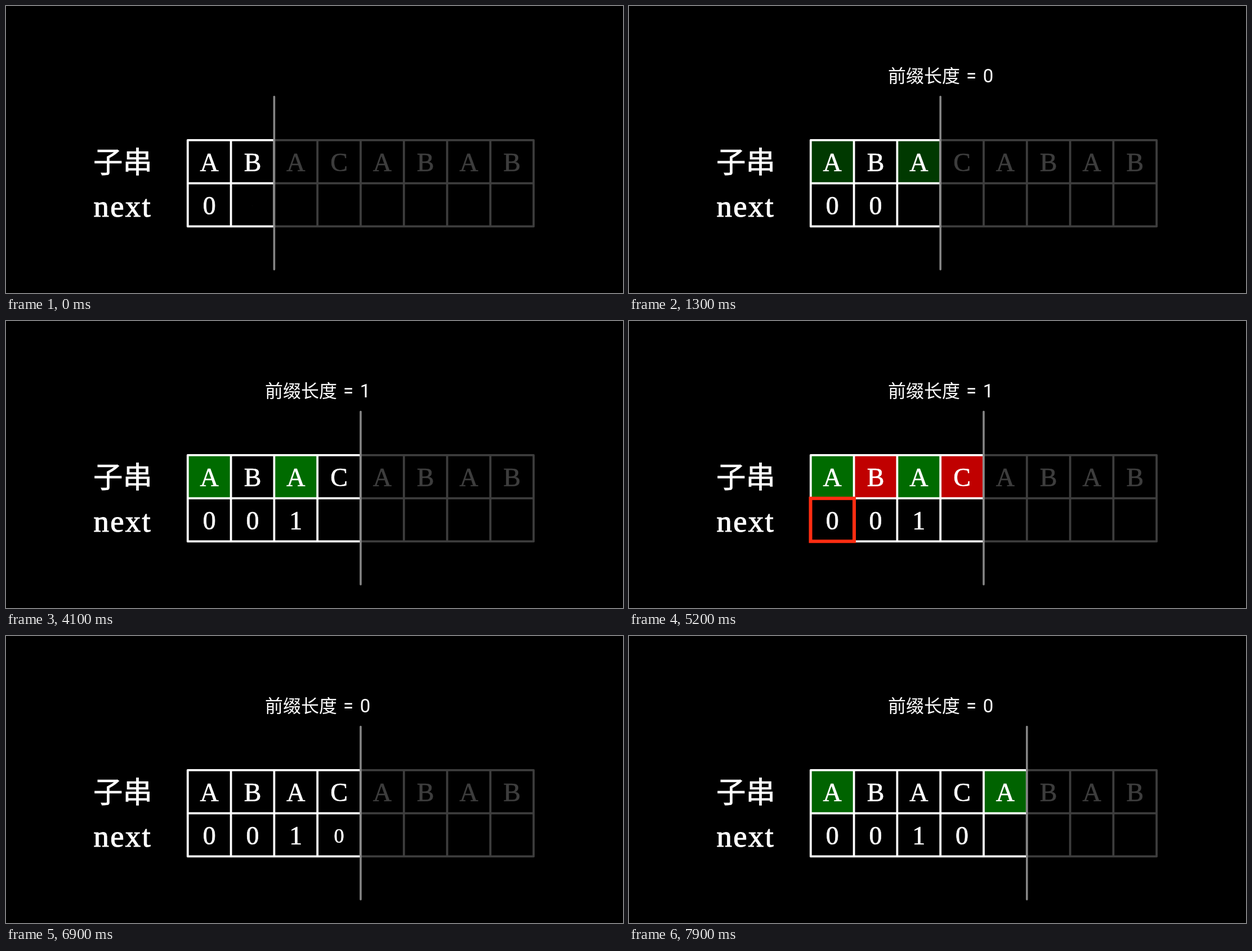
An HTML page for the animation above (8000 ms loop, 1096x511 px).

```html
<!DOCTYPE html>
<html lang="zh-CN">
<head>
<meta charset="utf-8">
<title>next</title>
<style>
  html, body { margin: 0; width: 100%; height: 100%; overflow: hidden; background: #000; }
  svg { display: block; width: 100%; height: 100%; }
  text { fill: #fff; }
  .cjk { font-family: "Noto Sans CJK SC", "Noto Sans CJK", sans-serif; }
  .serif { font-family: "Liberation Serif", serif; stroke: #fff; stroke-width: .7; }
  .sans { font: 33px Roboto, sans-serif; }
  .cell { font-size: 46px; text-anchor: middle; }
  .mid { text-anchor: middle; }
  #title { font-size: 52.5px; stroke: #fff; stroke-width: .7; }
  #next { font-size: 55px; letter-spacing: 2.2px; stroke-width: 1; }
  #grid { fill: none; stroke: #fff; stroke-width: 3.8; stroke-linecap: round; }
  #match { fill: #006b00; }
  #differ { fill: #c00000; }
  #bar { stroke: #858585; stroke-width: 3.6; stroke-linecap: round; }
  #ring { fill: none; stroke: #ff2d12; stroke-width: 6; }
</style>
</head>
<body>
<svg viewBox="0 0 1096 511">
  <text class="cjk" id="title" x="155" y="296.5">子串</text>
  <text class="serif" id="next" x="155.5" y="374.5">next</text>
  <g id="label">
    <text class="cjk" x="460" y="135.5" font-size="32">前缀长度</text>
    <text class="sans mid" x="608" y="135.5">=</text>
    <text class="sans mid" id="digit" x="638" y="135.5">0</text>
  </g>
  <text class="sans" id="plus" x="668.5" y="135.5" style="fill:#f5210f">+1</text>
  <g id="match"></g>
  <g id="differ"></g>
  <path id="grid"/>
  <g id="cells"></g>
  <rect id="shade" y="230" height="170" opacity=".76"/>
  <line id="bar" y1="161.5" y2="469"/>
  <rect id="ring" x="322.5" y="315.8" width="77.5" height="76.5"/>
</svg>
<script>
const LOOP = 8000, LEFT = 322.8, TOP = 238.8, SIZE = 76.8;
const $ = id => document.getElementById(id);
const colX = i => LEFT + SIZE * i;

const ramp = (t, from, to) => Math.min(1, Math.max(0, (t - from) / (to - from)));
const easeOut = p => 1 - (1 - p) ** 2;
const popOut = p => 1 - (1 - p) ** 3;
const easeInOut = p => p < .5 ? 4 * p ** 3 : 1 - 4 * (1 - p) ** 3;
const fade = (id, v) => $(id).setAttribute('opacity', v);

// Rises, dips and rises again, 250 ms each way.
function blink(t, start) {
  const p = Math.max(0, (t - start) / 250);
  return easeOut(p < 1 ? p : p < 2 ? 2 - p : Math.min(1, p - 2));
}

function add(parent, tag, attrs, text = '') {
  const node = document.createElementNS('http://www.w3.org/2000/svg', tag);
  for (const key in attrs) node.setAttribute(key, attrs[key]);
  node.textContent = text;
  return $(parent).appendChild(node);
}

const addFill = (parent, i) =>
  add(parent, 'rect', { x: colX(i), y: TOP, width: SIZE, height: SIZE });

let path = '';
for (let row = 0; row < 3; row++) path += `M${LEFT} ${TOP + SIZE * row}H${colX(8)}`;
for (let col = 0; col < 9; col++) path += `M${colX(col)} ${TOP}V${TOP + SIZE * 2}`;
$('grid').setAttribute('d', path);

[...'ABACABAB'].forEach((letter, i) =>
  add('cells', 'text', { class: 'serif cell', x: colX(i + .5), y: 293.5 }, letter));
const values = [...'0010'].map(value =>
  add('cells', 'text', { class: 'serif cell', y: 15.2 }, value));

const matches = [0, 2, 4].map(i => addFill('match', i));
[1, 3].forEach(i => addFill('differ', i));

const popStarts = [-1000, 0, 3150, 6800];
const moves = [[360, 910], [3600, 4090], [7210, 7750]];

function draw(t) {
  values.forEach((node, i) => {
    const scale = popOut(ramp(t, popStarts[i], popStarts[i] + 250));
    node.setAttribute('transform', `translate(${colX(i + .5)} 356) scale(${scale})`);
  });

  const x = colX(2 + moves.reduce((sum, [a, b]) => sum + easeInOut(ramp(t, a, b)), 0));
  $('bar').setAttribute('x1', x);
  $('bar').setAttribute('x2', x);
  $('shade').setAttribute('x', x);
  $('shade').setAttribute('width', 950 - x);

  const clear = 1 - ramp(t, 5250, 5655);
  const first = blink(t, 880) * clear, second = blink(t, 7720);
  [first + second, first, second].forEach((v, i) => matches[i].setAttribute('opacity', v));
  fade('differ', blink(t, 4120) * clear);
  fade('ring', ramp(t, 4880, 5080) * (1 - ramp(t, 5330, 5930)));

  fade('label', ramp(t, 50, 450));
  $('digit').textContent = t >= 3000 && t < 5500 ? '1' : '0';
  fade('digit', t < 4000
    ? Math.max(1 - ramp(t, 2800, 3000), ramp(t, 3000, 3200))
    : Math.max(1 - ramp(t, 5330, 5500), ramp(t, 5500, 5670)));

  const shown = easeOut(ramp(t, 2050, 2300)) * (1 - ramp(t, 2800, 3050));
  fade('plus', shown);
  $('plus').setAttribute('transform', `translate(${-26 * (1 - shown)} 0)`);
}

function tick() {
  draw(performance.now() % LOOP);
  requestAnimationFrame(tick);
}
tick();
</script>
</body>
</html>
```
